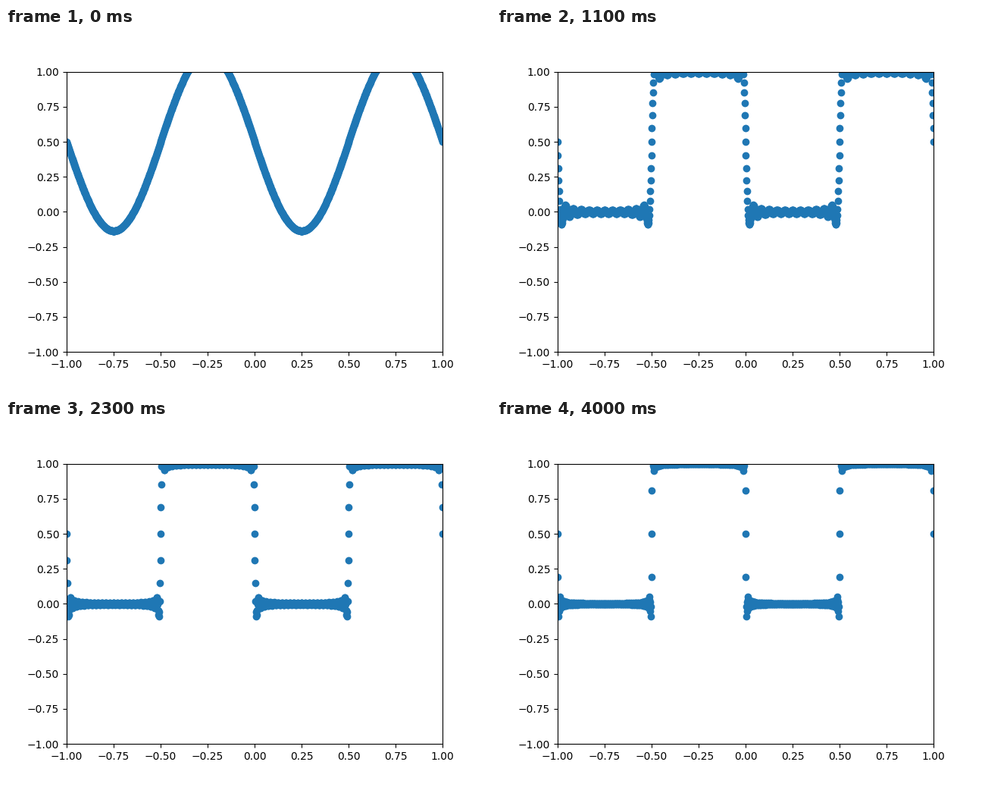
These frames come from a looping animation (640x480 px, 4.1 s). A matplotlib script:

```python
import numpy as np
import matplotlib.pyplot as plt
from matplotlib.animation import FuncAnimation

FRAMES = 41
INTERVAL = 100  # ms

x = np.linspace(-1, 1, 1001)


def square_wave(terms):
    """Partial Fourier sum of a square wave between 0 and 1."""
    odd = 2 * np.arange(1, terms + 1)[:, None] - 1
    return 0.5 - 2 / np.pi * np.sum(np.sin(2 * np.pi * odd * x) / odd, axis=0)


fig, ax = plt.subplots(figsize=(6.4, 4.8), dpi=100)
ax.set_xlim(-1, 1)
ax.set_ylim(-1, 1)
dots, = ax.plot(x, square_wave(1), "o", color="#1f77b4")


def update(frame):
    dots.set_ydata(square_wave(frame + 1))
    return dots,


anim = FuncAnimation(fig, update, frames=FRAMES, interval=INTERVAL,
                     repeat=True, repeat_delay=0, blit=False)
plt.show()
```
